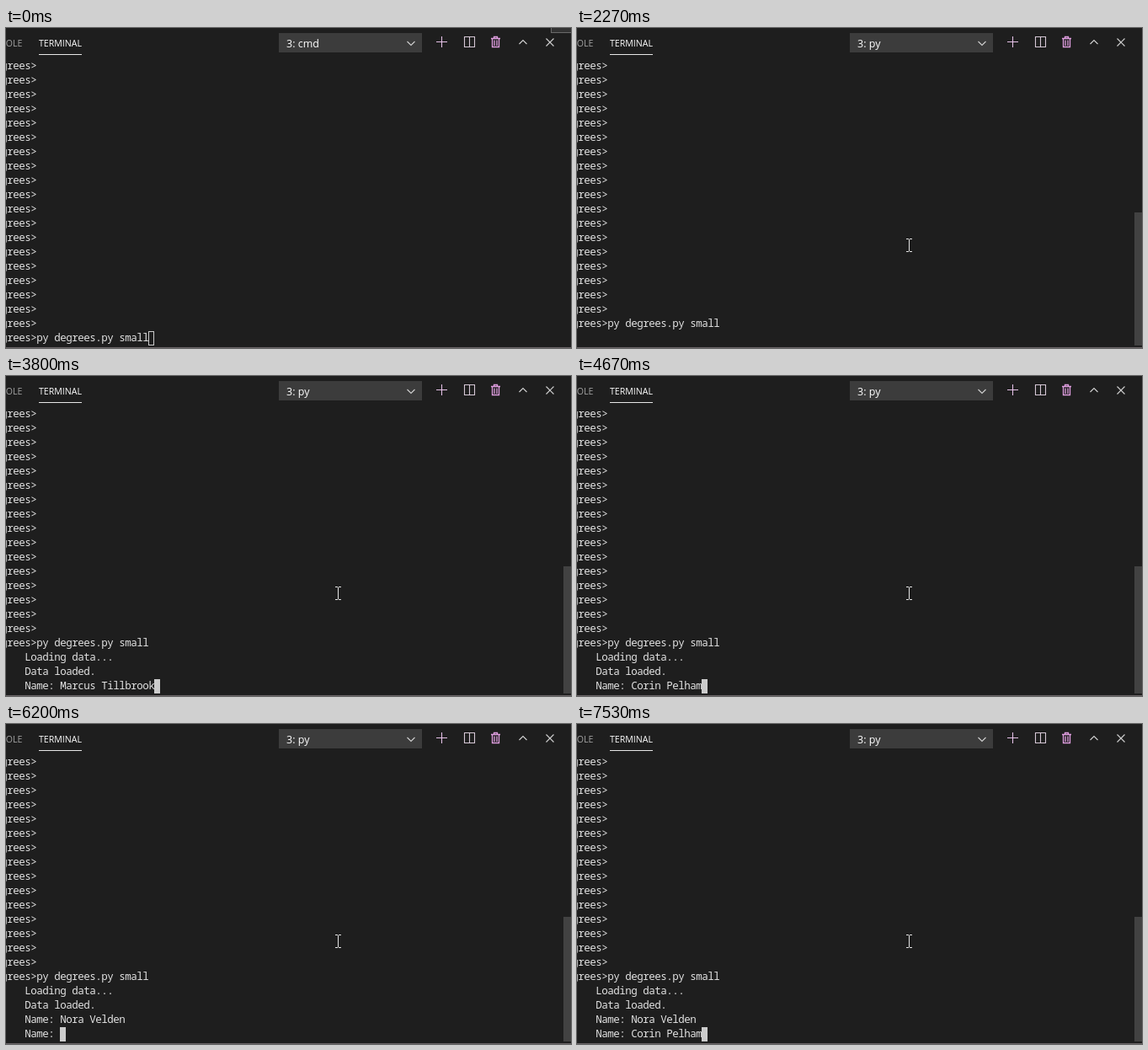
Recreate the animation shown at these times as an HTML page. Size 671 by 380 pixels, loop 8 s.

```html
<!DOCTYPE html>
<html lang="en">
<head>
<meta charset="utf-8">
<title>Terminal</title>
<style>
  html, body { margin: 0; width: 100%; height: 100%; overflow: hidden; background: #1e1e1e; }
  svg { display: block; }
  .ui { font-family: "Open Sans", "Noto Sans", sans-serif; }
  .tab { font-size: 10.6px; }
  #rows text {
    font: 12.5px "Noto Sans Mono", "DejaVu Sans Mono", monospace;
    letter-spacing: -0.5px;
    fill: #e2e2e2;
    white-space: pre;
  }
  .icon { fill: none; stroke: #d0d0d0; stroke-width: 1.1; }
</style>
</head>
<body>
<svg width="671" height="380" viewBox="0 0 671 380">
  <rect width="671" height="380" fill="#1e1e1e"/>

  <g class="ui">
    <text class="tab" x="19.5" y="22" text-anchor="end" fill="#a2a2a2">CONSOLE</text>
    <text class="tab" x="39" y="22" fill="#fff">TERMINAL</text>
    <rect x="39" y="31" width="51" height="1" fill="#e7e7e7"/>
    <rect x="324" y="6" width="170" height="23" fill="#3c3c3c"/>
    <text id="shell" x="333" y="23" font-size="12.5" fill="#fff"></text>
  </g>

  <g class="icon">
    <path d="M476.5 16l4.5 4.5 4.5-4.5"/>
    <path d="M511 16.5h13M517.5 10v13" stroke="#e4c0e6"/>
    <path d="M544.5 10.5h12v12h-12zM550.5 10.5v12" stroke="#d6c8d6"/>
    <path d="M576 12.5h11M579.5 12v-1.5h4v1.5M577.5 13v9.500h8v-9.500M580 14.500v6.500M583 14.500v6.500" stroke="#e09ee0" stroke-width="1.3"/>
    <path d="M609.5 19l4.5-4.5 4.5 4.5"/>
    <path d="M641.5 12.5l9 9M650.5 12.5l-9 9"/>
  </g>
  <rect id="tip" x="647.5" y="-2" width="30" height="7.5" fill="#333" stroke="#6a6a6a"/>

  <g id="rows"></g>
  <rect id="caret" fill="#ccc"/>
  <rect id="slider" x="662" width="9" fill="#797979"/>
  <path id="mouse" d="M-3.5 -7.5h3M.5 -7.5h3M0 -7v14M-3.5 7.5h3M.5 7.5h3" fill="none" stroke="#e4e4e4"/>
  <rect y="379" width="671" height="1" fill="#686264"/>
</svg>

<script>
const LOOP = 8000, ROWS = 20, TOP = 37, LINE = 17, CHAR = 7, LEFT = -6;
const PROMPT = "grees>", INDENT = "    ";
const COMMAND = PROMPT + "py degrees.py small";
const [ANNE, BEN, CARA, DAN] = ["Marcus Tillbrook", "Edwin Hallock", "Corin Pelham", "Nora Velden"];

const $ = id => document.getElementById(id);
const field = name => INDENT + "Name: " + name;
const session = (...names) =>
  [COMMAND, INDENT + "Loading data...", INDENT + "Data loaded.", ...names.map(field)];

// Each entry: start time, lines below the empty prompts, slider top
const scenes = [
  [0, [COMMAND], 215],
  [2270, [COMMAND, ""], 219],
  [2400, session(""), 226],
  [3800, session(ANNE), 226],
  [4270, session(BEN), 226],
  [4670, session(CARA), 226],
  [5530, session(DAN), 226],
  [6200, session(DAN, ""), 229],
  [6530, session(DAN, DAN), 229],
  [7530, session(DAN, CARA), 229]
];

// Each entry: start time, pointer x and y, slider opacity
const pointer = [
  [0, -20, -20, 0],
  [270, 548.5, 104, 0.05],
  [337, 450.5, 193, 0.2],
  [403, 400.5, 243, 0.4],
  [470, 394.5, 258, 0.4]
];

const at = (list, t) => list.filter(step => step[0] <= t).pop();

function set(el, attrs) {
  for (const key in attrs) el.setAttribute(key, attrs[key]);
}

const rows = Array.from({ length: ROWS }, (_, i) => {
  const row = document.createElementNS("http://www.w3.org/2000/svg", "text");
  set(row, { x: LEFT + 0.25, y: TOP + LINE * i + 12 });
  return $("rows").appendChild(row);
});

let shown;
function showScene(scene) {
  if (scene === shown) return;
  shown = scene;
  const [start, lines, sliderTop] = scene;
  const blanks = ROWS - lines.length;
  rows.forEach((row, i) => { row.textContent = i < blanks ? PROMPT : lines[i - blanks]; });
  $("shell").textContent = start < 2270 ? "3: cmd" : "3: py";
  set($("slider"), { y: sliderTop, height: 377 - sliderTop });
}

function showCaret(column, focused) {
  const x = LEFT + CHAR * column, y = TOP + LINE * (ROWS - 1);
  set($("caret"), focused
    ? { x, y, width: 7, height: 17, fill: "#ccc", stroke: "none" }
    : { x: x + 0.5, y: y + 0.5, width: 6, height: 16, fill: "none", stroke: "#ccc" });
}

function draw() {
  const t = performance.now() % LOOP;
  const scene = at(scenes, t), [, x, y, opacity] = at(pointer, t);
  const focused = t >= 670;
  showScene(scene);
  showCaret(scene[1].at(-1).length || -2, focused);
  set($("mouse"), { transform: `translate(${x} ${y})` });
  set($("slider"), { "fill-opacity": opacity });
  set($("tip"), { visibility: focused ? "hidden" : "visible" });
  requestAnimationFrame(draw);
}
draw();
</script>
</body>
</html>
```
